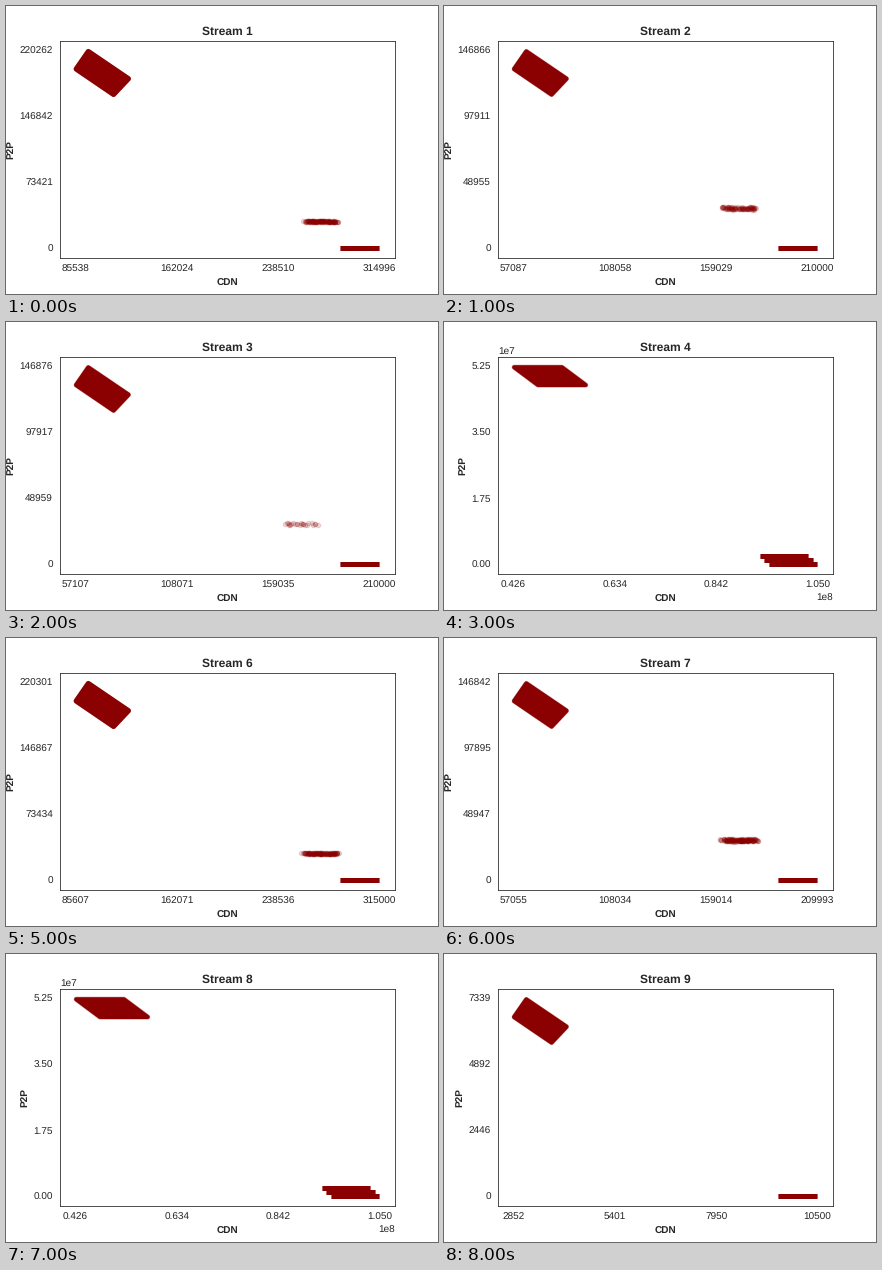
These frames come from a looping animation (432 px wide and 288 px high, 9000 ms). A matplotlib script:

```python
import numpy as np
import matplotlib.pyplot as plt
from matplotlib.animation import FuncAnimation

INK, RED = "0.15", "darkred"
plt.rcParams.update({
    "font.family": "Liberation Sans", "font.size": 10, "text.hinting": "none",
    "text.color": INK, "axes.labelcolor": INK, "axes.edgecolor": INK,
    "xtick.color": INK, "ytick.color": INK, "axes.linewidth": .8,
    "xtick.major.size": 0, "ytick.major.size": 0,
    "xtick.major.pad": 7, "ytick.major.pad": 7,
})

# x range, top of y, points in the middle cluster (0: solid, None: no cluster)
BULK = (42.6e6, 105e6, 52.5e6, None)
STREAMS = [
    (85538, 314996, 220262.4, 130),
    (57087, 210000, 146866, 90),
    (57106.6, 209999.6, 146876, 24),
    BULK,
    (57127, 210000, 146876, 0),
    (85607, 315000, 220301, 130),
    (57055, 209993, 146842, 160),
    BULK,
    (2851.6, 10499.6, 7338.6, None),
]

# Shapes live in unit coordinates spanning the first to the last tick.
BLOCK = np.array([(.043, .995), (.175, .857), (.126, .777), (.003, .906)])


def band(u, width, v, height=0):
    """Leaning parallelogram whose top left corner is (u, v)."""
    lean, low = u + .87 * height, v - height
    return np.array([(u, v), (u + width, v), (lean + width, low), (lean, low)])


fig = plt.figure(figsize=(6, 4), dpi=72, facecolor="white")
ax = fig.add_axes([.125, .125, .775, .755])


def draw(i):
    x0, x1, top, count = STREAMS[i]
    rng = np.random.default_rng(i + 3)
    ax.clear()

    def place(pts):
        return x0 + pts[:, 0] * (x1 - x0), pts[:, 1] * top

    def solid(pts, soft=0):
        for width, alpha in [(5, .4), (5 - soft, 1)]:
            ax.fill(*place(pts), color=RED, lw=width, alpha=alpha,
                    joinstyle="round")

    def cloud(pts, n):
        s = rng.beta(1.5, 1.5, (n, 1))
        t = rng.random((n, 1))
        tl, tr, _, bl = pts
        ax.scatter(*place(tl + s * (tr - tl) + t * (bl - tl)),
                   s=20, c=RED, lw=1, alpha=.15)

    if top > 1e6:
        solid(band(.003, .157, .996, .09), soft=1)
        for k in range(3):
            solid(band(.84 - .0153 * k, .159, .0193 * k))
    else:
        solid(BLOCK, soft=.8 * (top < 2e5))
        solid(band(.87, .129, 0))
    if count is not None:
        v = 30600 / top
        height = (2000 if count else 3000) / top
        middle = band(.877 - .98 * v, .127, v, height)
        if count:
            cloud(middle, count)
        else:
            solid(middle)

    pad = .05 * (x1 - x0)
    ax.set_xlim(x0 - pad, x1 + pad)
    ax.set_ylim(-.05 * top, 1.05 * top)
    ax.set_xticks(np.linspace(x0, x1, 4))
    ax.set_yticks(np.linspace(0, top, 4))
    ax.set_xlabel("CDN", weight="bold")
    ax.set_ylabel("P2P", weight="bold")
    ax.set_title(f"Stream {i + 1}", size=12, weight="bold")
    return []


anim = FuncAnimation(fig, draw, frames=len(STREAMS), interval=1000,
                     init_func=lambda: [], repeat=True, repeat_delay=0)
plt.show()
```
